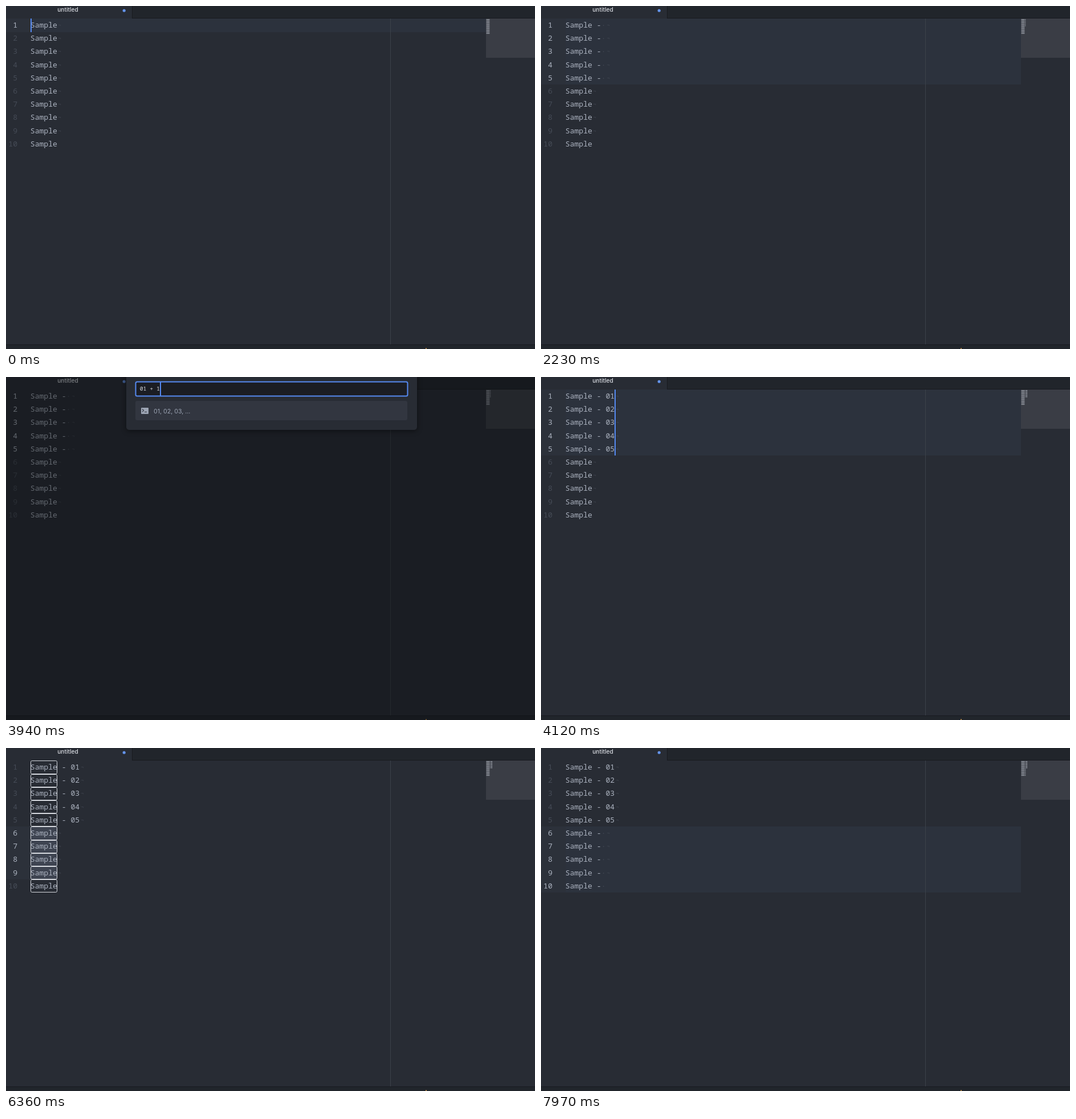
An HTML page with a canvas for the animation above (8000 ms loop, 928 px wide and 603 px high).

```html
<!DOCTYPE html>
<html lang="en">
<head>
<meta charset="utf-8">
<title>Numbered lines</title>
<style>
html, body { margin: 0; width: 100%; height: 100%; overflow: hidden; background: #282c34; }
canvas { display: block; width: 928px; height: 603px; }
</style>
</head>
<body>
<canvas id="stage" width="928" height="603"></canvas>
<script>
const ctx = document.getElementById('stage').getContext('2d');
const W = 928, H = 603, LOOP = 8000;
const TOP = 22.3, ROW = 23.2, LEFT = 42.8, CHAR = 7.87;
const MONO = '"Noto Sans Mono", "DejaVu Sans Mono", monospace';
const SANS = 'Inter, "Liberation Sans", sans-serif';
const BLUE = '#568af2';

// Each step changes part of the editor state from its time on.
const steps = [
  [0, { from: 1, to: 1, col: 0, on: true, sel: false, box: false, head: '', tail: '', panel: false, dim: 0 }],
  [290, { sel: true }],
  [410, { box: true }],
  [590, { to: 2 }],
  [700, { to: 3 }],
  [820, { to: 4 }],
  [930, { to: 5 }],
  [1050, { sel: false, col: 6 }],
  [1160, { box: false }],
  [1460, { head: ' ', col: 7 }],
  [1580, { head: ' -', col: 8 }],
  [1760, { head: ' - ', col: 9 }],
  [2230, { on: false }],
  [2350, { panel: true, dim: 0.38, query: '', result: '', caret: true }],
  [2400, { dim: 0.45 }],
  [2580, { caret: false }],
  [2880, { query: '0', caret: true, result: '0, 1, 2, ...' }],
  [2940, { query: '01' }],
  [2990, { result: '01, 02, 03, ...' }],
  [3350, { caret: false }],
  [3520, { query: '01 ', caret: true }],
  [3610, { query: '01 +' }],
  [3700, { query: '01 + ' }],
  [3940, { query: '01 + 1' }],
  [4120, { panel: false, dim: 0, head: ' - 0#', col: 11, on: true }],
  [4540, { on: false }],
  [4660, { to: 1 }],
  [4960, { from: 2, to: 2, on: true }],
  [5080, { from: 3, to: 3 }],
  [5250, { from: 4, to: 4 }],
  [5430, { from: 5, to: 5 }],
  [5550, { from: 6, to: 6, col: 6 }],
  [5780, { sel: true }],
  [5840, { box: true }],
  [6010, { to: 7 }],
  [6190, { to: 8 }],
  [6360, { to: 9 }],
  [6780, { to: 10 }],
  [6870, { sel: false }],
  [6960, { box: false }],
  [7320, { tail: ' ', col: 7 }],
  [7400, { tail: ' -', col: 8 }],
  [7490, { tail: ' - ', col: 9 }],
  [7970, { on: false }]
];

function stateAt(t) {
  return Object.assign({}, ...steps.filter(s => s[0] <= t).map(s => s[1]));
}

function rect(x, y, w, h, color) {
  ctx.fillStyle = color;
  ctx.fillRect(x, y, w, h);
}

function round(x, y, w, h, r, fill, stroke, width = 1) {
  ctx.beginPath();
  ctx.roundRect(x, y, w, h, r);
  if (fill) { ctx.fillStyle = fill; ctx.fill(); }
  if (stroke) { ctx.strokeStyle = stroke; ctx.lineWidth = width; ctx.stroke(); }
}

function text(str, x, y, font, color, align = 'left') {
  ctx.font = font;
  ctx.textAlign = align;
  ctx.fillStyle = color;
  ctx.fillText(str, x, y);
}

const rowTop = n => Math.round(TOP + (n - 1) * ROW);

function lineText(n, s) {
  return 'Sample' + (n < 6 ? s.head.replace('#', n) : s.tail);
}

function drawFrame() {
  rect(0, 0, W, H, '#282c34');
  rect(221, 0, W - 221, 22, '#21252b');
  rect(221, 21, W - 221, 1, '#181a1f');
  rect(221, 0, 1, 22, '#181a1f');
  text('untitled', 108.5, 10.3, '500 10.2px ' + SANS, '#d7dae0', 'center');
  ctx.beginPath();
  ctx.arc(207.2, 8, 2.6, 0, Math.PI * 2);
  ctx.fillStyle = '#6494ed';
  ctx.fill();
}

function drawLine(n, s) {
  const y = rowTop(n), h = rowTop(n + 1) - y, base = TOP + (n - 1) * ROW + 15.7;
  const active = n >= s.from && n <= s.to;
  const line = lineText(n, s), used = line.trimEnd().length;

  if (active && s.dim < 0.4) {
    rect(0, y, 43, h, '#2c313a');
    if (!s.sel) rect(43, y, 799, h, '#2c323d');
  }
  if (active && s.sel) rect(43, y, 47, h, '#3e4451');
  text(n, 20, base, '13.1px ' + MONO, active ? '#abb2bf' : '#454b56', 'right');
  text(line, LEFT, base, '13.1px ' + MONO, '#abb2bf');

  for (let c = used; c < line.length; c++) {
    text('·', LEFT + c * CHAR, base, '13.1px ' + MONO, '#434954');
  }
  if (n < 10) text('¬', LEFT + line.length * CHAR + 1.8, base - 1, '8.5px ' + MONO, '#434954');
  if (s.box) round(43.5, y + 0.5, 46, h - 1, 2, null, '#d7dae0');
  if (active && s.on && !s.sel) {
    rect(Math.round(LEFT + s.col * CHAR), y, 2, h, BLUE);
  }
}

function drawMinimap(s) {
  rect(842, 22, 86, 69, '#3a3d45');
  for (let n = 1; n <= 10; n++) {
    [...lineText(n, s)].forEach((c, i) => {
      if (c !== ' ') rect(842.6 + i * 0.95, 23 + (n - 1) * 2.7, 0.95, 1.7, '#a0a5ae');
    });
  }
}

function drawPanel(s) {
  ctx.save();
  ctx.shadowColor = 'rgba(0,0,0,.45)';
  ctx.shadowBlur = 10;
  ctx.shadowOffsetY = 2;
  round(211, -10, 510, 103, 5, '#282c34');
  ctx.restore();

  round(227.5, 8.5, 477, 25, 2.5, '#1b1d23', BLUE, 2);
  const font = '9.8px ' + MONO;
  text(s.query || 'example) 01 + 2', 234.7, 24, font, s.query ? '#d7dae0' : '#7b808a');
  if (s.caret) rect(Math.round(234.8 + s.query.length * 5.88), 9, 2, 24, BLUE);

  round(227, 42, 477, 34, 3, '#323640');
  round(237, 54, 13, 11, 1, '#9da5b4');
  ctx.strokeStyle = '#323640';
  ctx.lineWidth = 1.2;
  ctx.beginPath();
  ctx.moveTo(239, 56.3);
  ctx.lineTo(241.5, 58.8);
  ctx.lineTo(239, 61.3);
  ctx.moveTo(243, 61.5);
  ctx.lineTo(247, 61.5);
  ctx.stroke();
  text(s.result, 259, 64, '10.6px ' + SANS, '#9da5b4');
}

function draw(t) {
  const s = stateAt(t);
  drawFrame();
  for (let n = 1; n <= 10; n++) drawLine(n, s);
  rect(674, 22, 1, 573, '#3c4149');
  drawMinimap(s);
  rect(0, 595, W, 8, '#21252b');
  rect(0, 595, W, 1, '#181a1f');
  rect(736, 601.5, 2, 1.5, '#d19a4f');
  if (s.dim) rect(0, 0, W, H, `rgba(10,12,14,${s.dim})`);
  if (s.panel) drawPanel(s);
}

const start = performance.now();
function tick() {
  draw((performance.now() - start) % LOOP);
  requestAnimationFrame(tick);
}
tick();
</script>
</body>
</html>
```
